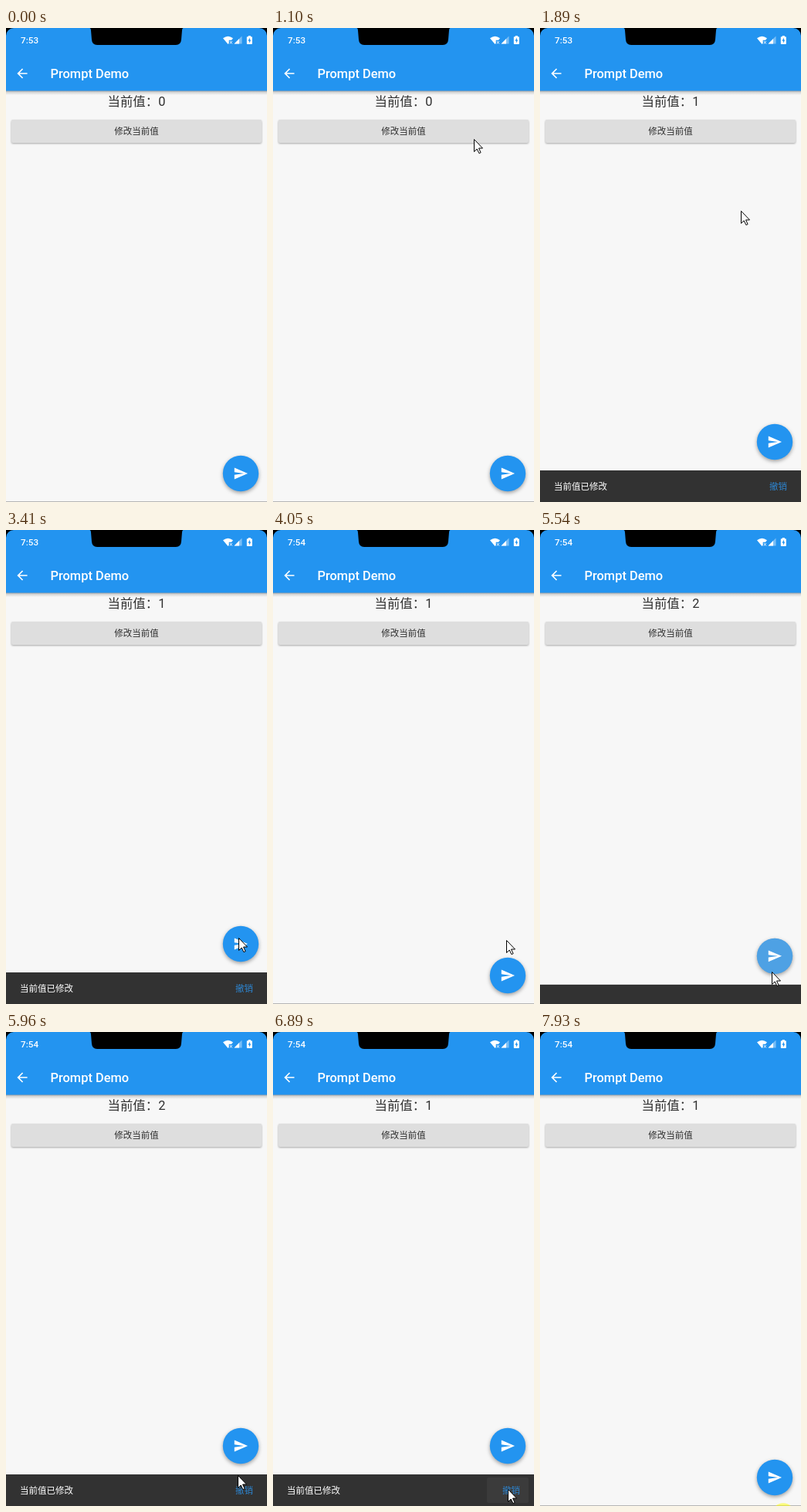
An HTML page that plays this animation: 338x615 px, repeating every 8110 ms.

```html
<!DOCTYPE html>
<html lang="zh-CN">
<head>
<meta charset="utf-8">
<title>Prompt Demo</title>
<style>
html, body { margin: 0; width: 100%; height: 100%; overflow: hidden; background: #f7f7f7; }
svg { display: block; width: 100%; height: 100%; }
text { font-family: Roboto, "Noto Sans CJK SC", "Noto Sans CJK", sans-serif; font-size: 11.5px; }
.raised { filter: drop-shadow(0 1.2px 1px rgba(0,0,0,.32)); }
.floating { filter: drop-shadow(0 2.5px 2.5px rgba(0,0,0,.36)); }
.ink { fill: #c2c2c2; opacity: 0; }
</style>
</head>
<body>
<svg viewBox="0 0 338 615">
  <defs>
    <linearGradient id="shade" x2="0" y2="1">
      <stop stop-color="#000" stop-opacity=".38"/>
      <stop offset=".4" stop-color="#000" stop-opacity=".14"/>
      <stop offset="1" stop-color="#000" stop-opacity="0"/>
    </linearGradient>
    <clipPath id="buttonShape"><rect x="7" y="119" width="324" height="30" rx="2"/></clipPath>
  </defs>

  <rect width="338" height="615" fill="#f7f7f7"/>
  <rect y="614" width="338" height="1" fill="#b5b5b5"/>

  <!-- app bar -->
  <rect y="81" width="338" height="6" fill="url(#shade)"/>
  <rect width="338" height="81.5" fill="#2394f0"/>
  <path d="M0 0H10A10 10 0 0 0 0 10ZM338 0H328A10 10 0 0 1 338 10Z"/>
  <path d="M108.500 0Q110 .5 110 3L111 15Q111.500 22 118 22H220Q226.500 22 227 15L228 3Q228 .5 229.500 0Z"/>
  <g fill="#fff">
    <text id="clock" x="19" y="20" font-weight="500" style="font-size:11.7px"></text>
    <path d="M281 13.300Q287.500 8.300 294 13.300L292 15.700H288.700V19.800L287.500 21Z"/>
    <path d="M290 17l2.800 3.500m0-3.500l-2.800 3.500" stroke="#fff" stroke-width=".9"/>
    <path d="M305.500 10.500V20.500H295.500Z" opacity=".4"/>
    <path d="M302 14V20.500H295.500Z"/>
    <path d="M313.800 10h3v1.200h1.200q.8 0 .8.800v8.200q0 .8-.8.800h-5.400q-.8 0-.8-.8V12q0-.8.8-.8h1.200Z"/>
    <path d="M315.900 12.500l-2.500 4.200h1.500v3l2.400-4.200h-1.400Z" fill="#2394f0"/>
    <path transform="translate(11.140 49.140) scale(.8216)" d="M20 11H7.830l5.590-5.590L12 4l-8 8 8 8 1.410-1.410L7.830 13H20Z"/>
    <text x="57.500" y="65" font-weight="500" style="font-size:16.430px">Prompt Demo</text>
  </g>

  <!-- page -->
  <text id="value" x="169" y="101.300" text-anchor="middle" fill="#303030" style="font-size:16.430px"></text>
  <rect class="raised" x="7" y="119" width="324" height="30" rx="2" fill="#dedede"/>
  <g clip-path="url(#buttonShape)">
    <rect id="buttonInk" class="ink" x="7" y="119" width="324" height="30"/>
    <circle id="buttonSplash" class="ink" cx="260" cy="144"/>
  </g>
  <text x="169" y="138.300" text-anchor="middle" fill="#303030">修改当前值</text>

  <g id="snack">
    <rect width="338" height="42" fill="#323232"/>
    <rect id="undoInk" x="277" y="4" width="54" height="33" rx="2" fill="#fff" opacity="0"/>
    <g id="snackText" font-weight="500">
      <text x="18" y="25" fill="#fff">当前值已修改</text>
      <text x="297" y="25" fill="#2d86d2">撤销</text>
    </g>
  </g>

  <g id="fab">
    <circle class="floating" cx="304" cy="578" r="23.200" fill="#2394f0"/>
    <circle id="fabInk" class="ink" cx="304" cy="578" r="23.200"/>
    <path transform="translate(294.140 568.140) scale(.8216)" fill="#fff" d="M2.010 21L23 12 2.010 3 2 10l15 2-15 2Z"/>
  </g>

  <circle id="press" r="15" fill="#ff0" fill-opacity=".5"/>
  <path id="cursor" d="M.5.5V16.500L4.200 13 6.900 18.600 9.100 17.600 6.500 12H11.500Z" fill="#fff" stroke="#000"/>
</svg>

<script>
const LOOP = 8110, TICK = 50, SNACK_HEIGHT = 41, SNACK_TIME = 250;
const el = Object.fromEntries([...document.querySelectorAll('[id]')].map(e => [e.id, e]));

// start, end, positions, from x, y, to x, y, easing power
const moves = [
  [30, 810, 17, 285, 578, 261, 151, 1],
  [880, 1100, 4, 261, 150, 260, 144, 1],
  [1610, 1840, 5, 260, 148, 260, 215, 1.3],
  [1890, 2350, 10, 260, 237, 301, 498, 1],
  [2910, 3410, 10, 301, 500, 301, 529, 1],
  [3990, 4180, 4, 302, 532, 307, 541, 1],
  [4670, 5030, 9, 307, 547, 300, 573, 1],
  [5960, 6240, 7, 300, 575, 304, 593, 1],
  [7320, 7510, 5, 304, 597, 306, 616, 1]
];
// time, length, x, y
const presses = [[1380, 180, 260, 144], [5260, 180, 300, 573], [6630, 180, 304, 593], [7930, 180, 315, 626.3]];
const shows = [[1560, 3690], [5440, 6870]];

const clamp = v => Math.max(0, Math.min(1, v));
const bezier = (a, b, s) => 3 * a * s * (1 - s) ** 2 + 3 * b * s * s * (1 - s) + s ** 3;

// cubic-bezier(.4, 0, .2, 1)
function ease(x) {
  let low = 0, high = 1;
  for (let i = 0; i < 20; i++) {
    const mid = (low + high) / 2;
    if (bezier(.4, .2, mid) < x) low = mid; else high = mid;
  }
  return bezier(0, 1, low);
}

// progress in whole ticks
const progress = (t, start, length) => clamp(Math.floor((t - start) / TICK) * TICK / length);
const fade = (t, start, length, peak) => t < start ? 0 : peak * (1 - progress(t, start, length));
const place = (e, x, y) => e.setAttribute('transform', `translate(${x} ${y})`);

function cursorAt(t) {
  const [start, end, count, x0, y0, x1, y1, power] = moves.filter(m => m[0] <= t).pop();
  const step = Math.floor((t - start) / (end - start) * (count - 1) + 1e-6);
  const p = clamp(step / (count - 1)) ** power;
  return [Math.round(x0 + (x1 - x0) * p), Math.round(y0 + (y1 - y0) * p)];
}

function drawSnack(t) {
  const show = shows.find(([a, b]) => t >= a && t < b + SNACK_TIME);
  let height = 0, opacity = 0;
  if (show) {
    const leaving = t >= show[1];
    const p = leaving ? 1 - progress(t, show[1], SNACK_TIME) : progress(t, show[0], SNACK_TIME);
    height = SNACK_HEIGHT * ease(p);
    opacity = leaving ? 1 : clamp((p - .72) / .28);
  }
  place(el.snack, 0, 615 - height);
  place(el.fab, 0, -height);
  el.snackText.style.opacity = opacity;
}

function drawInk(t) {
  el.buttonInk.style.opacity = fade(t, 1560, 250, .2);
  el.buttonSplash.style.opacity = fade(t, 1560, 250, .35);
  el.buttonSplash.setAttribute('r', 25 + 220 * progress(t, 1560, 250));
  el.fabInk.style.opacity = t < 5440 ? .4 * progress(t, 5260, 150) : fade(t, 5440, 300, .4);
  el.undoInk.style.opacity = fade(t, 6810, 300, .05);
}

function draw(t) {
  el.clock.textContent = t < 3690 ? '7:53' : '7:54';
  el.value.textContent = '当前值：' + (t < 1560 ? 0 : t >= 5440 && t < 6810 ? 2 : 1);
  drawSnack(t);
  drawInk(t);

  const press = presses.find(([start, length]) => t >= start && t < start + length);
  el.press.style.display = press ? '' : 'none';
  if (press) place(el.press, press[2], press[3]);

  const visible = t >= 30 && t < 7510;
  el.cursor.style.display = visible ? '' : 'none';
  if (visible) place(el.cursor, ...cursorAt(t));
}

const origin = performance.now();
function frame() {
  draw((performance.now() - origin) % LOOP);
  requestAnimationFrame(frame);
}
draw(0);
requestAnimationFrame(frame);
</script>
</body>
</html>
```
